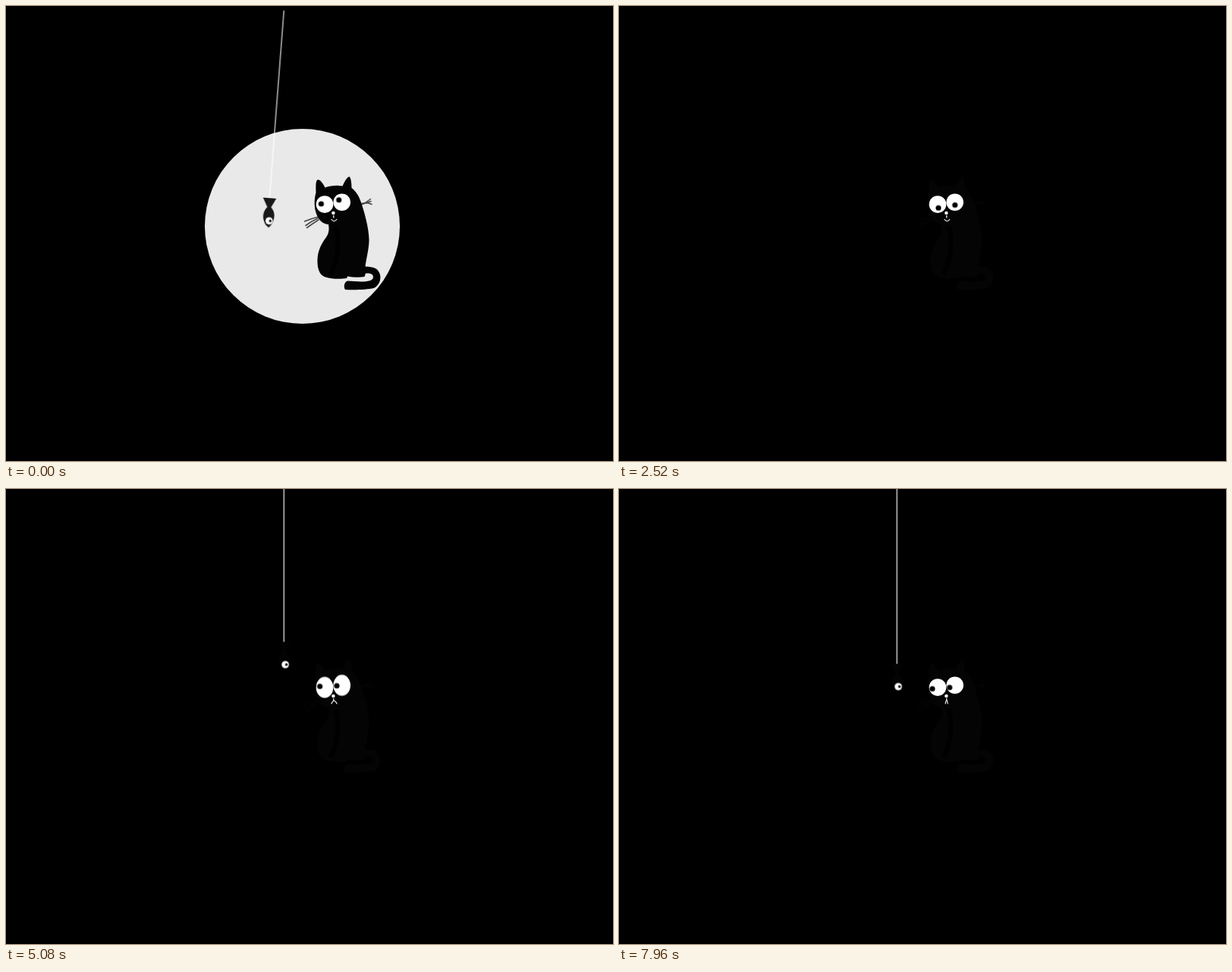
These frames come from a looping animation (800 px wide and 600 px high, 8000 ms). An HTML page:

```html
<!DOCTYPE html>
<html lang="en">
<head>
<meta charset="utf-8">
<title>Cat in the dark</title>
<style>
  html, body { margin: 0; width: 100%; height: 100%; overflow: hidden; background: #000; }
  svg { display: block; width: 800px; height: 600px; }

  .moon, .hook, .lid, .pupil, .mouth { animation: 8s linear infinite; }
  .moon { animation-name: fade; }
  .hook { animation-name: drop, hide; }
  .lid { animation-name: lid; transform-box: fill-box; transform-origin: center; }
  .pupil.left { animation-name: look-left; }
  .pupil.right { animation-name: look-right; }
  .mouth { animation-name: mouth; }

  @keyframes fade {
    0% { opacity: 1; }
    2.5%, 100% { opacity: 0; }
  }
  @keyframes hide {
    0% { opacity: 1; }
    2.5%, 44.4% { opacity: 0; }
    44.5%, 100% { opacity: 1; }
  }

  /* The line hangs from its top end, 248px above the fish. */
  @keyframes drop {
    0%, 2.5% { transform: translate(366.3px, 6px) rotate(4.4deg); }
    2.6% { transform: translate(366.3px, -293px) rotate(0deg); }
    44.5% { transform: translate(366.3px, -293px) rotate(0deg); animation-timing-function: ease-out; }
    50.5% { transform: translate(366.3px, -140px) rotate(0deg); animation-timing-function: cubic-bezier(.4, .3, .55, 1); }
    72% { transform: translate(366.3px, -20px) rotate(0deg); }
    100% { transform: translate(366.3px, -17.4px) rotate(0deg); }
  }

  @keyframes lid {
    0%, 7.5%, 11%, 22%, 25.5%, 36%, 39.5%, 46.5% { transform: scaleY(1); }
    9.25%, 23.75%, 37.75% { transform: scaleY(.1); }
    48.5%, 51% { transform: scaleY(1.28); }
    55%, 66% { transform: scaleY(1.22); }
    69%, 74% { transform: scaleY(1.45); }
    75.5% { transform: scaleY(.23); }
    75.75% { transform: scaleY(.1); }
    77.5%, 100% { transform: scaleY(1); }
  }

  @keyframes look-left {
    0% { transform: translate(413px, 261.5px); }
    1%, 15.5% { transform: translate(424.5px, 258.5px); }
    16.5%, 31% { transform: translate(416.7px, 266.3px); }
    32%, 46.5% { transform: translate(425px, 266.3px); }
    47.5%, 62% { transform: translate(414px, 255.3px); }
    63%, 73.5% { transform: translate(413.6px, 260.3px); }
    75%, 77.5% { transform: translate(416px, 262px); }
    78.5%, 93% { transform: translate(421px, 262px); }
    94%, 100% { transform: translate(413px, 263.5px); }
  }
  @keyframes look-right {
    0% { transform: translate(436px, 255.5px); }
    1%, 15.5% { transform: translate(449px, 256.5px); }
    16.5%, 31% { transform: translate(437px, 262.5px); }
    32%, 46.5% { transform: translate(448.3px, 262.5px); }
    47.5%, 62% { transform: translate(436px, 253px); }
    63%, 73.5% { transform: translate(436px, 259.5px); }
    75%, 77.5% { transform: translate(437.5px, 263.5px); }
    78.5%, 93% { transform: translate(444.5px, 259px); }
    94%, 100% { transform: translate(435.7px, 261.7px); }
  }

  @keyframes mouth {
    0%, 58% { d: path("M429 281.5Q432.3 286 435.8 281.5"); }
    62%, 88% { d: path("M429 283Q432.2 275.5 436 283"); }
    94%, 100% { d: path("M430.2 283Q431.8 274 433.2 283"); }
  }
</style>
</head>
<body>
<svg viewBox="0 0 800 600">
  <circle class="moon" cx="390.5" cy="290.5" r="128.5" fill="#fff"/>

  <g class="hook">
    <path d="M0 0V248" stroke="#fff" stroke-width="1.2"/>
    <g transform="translate(0 248)">
      <path d="M-8.5 0H9L3 12C9.500 18 9.500 27 5 35L2 39L-2 36C-8 28 -8 19 -2 12Z" fill="#030303"/>
      <circle cx="1.8" cy="30" r="4.8" fill="#fff"/>
      <circle cx="3.3" cy="30" r="1.8"/>
    </g>
  </g>

  <g class="cat">
    <g fill="none" stroke="#060606" stroke-opacity=".7" stroke-width="1.6" stroke-linecap="round">
      <path d="M412 278Q403 280 393.500 284M411 280Q402 284 395 289.500M412 282Q404 287 396.500 292.500"/>
      <path d="M466 263Q474 260 480.500 254.500M468 261Q475 258 482 261.500M468 262L481 257.500"/>
    </g>
    <path fill="#040404" d="M411 229C407.500 230 408.500 240 408.500 246C406 254 406 266 409 274
      C412 283 419 288 425 288C426 294 426 299 422 305C416 313 411 322 410.500 334
      C410 346 413 355 421 357.500C430 360.500 442 360 449 359L450 356.500C458 358 466 358 472.500 357
      L474 352.500C481 352 484 354 484 357.500C484 362 477 363.500 468 363.500L450 362.500
      C446 364 444.500 370 447 374C462 374.500 476 374 485 372C493 368 496 357 491 350
      C488.500 346 485 344 473.500 343.500C475 332 478.500 320 478.500 308C478 292 473 274 468 259
      C465 250 461 244 455.500 240C455.500 234 454.500 226 452.500 225C449 226 446 232 443.500 237.500
      C436 236 427 237 420.500 239.500C418 234 414 229 411 229Z"/>
    <path d="M434 291C441 310 437 335 428 354" fill="none" stroke="#000" stroke-width="6"/>

    <circle class="lid" cx="420" cy="261.6" r="11.3" fill="#fff"/>
    <circle class="lid" cx="442.7" cy="258.8" r="11.3" fill="#fff"/>
    <circle class="pupil left" r="3.6"/>
    <circle class="pupil right" r="3.6"/>

    <circle cx="431.4" cy="273" r="2.2" fill="#fff"/>
    <g fill="none" stroke="#fff" stroke-width="1.2">
      <path d="M431.800 276V279.500"/>
      <path class="mouth" d="M429 281.500Q432.300 286 435.800 281.500" stroke-linecap="round"/>
    </g>
  </g>
</svg>
</body>
</html>
```
